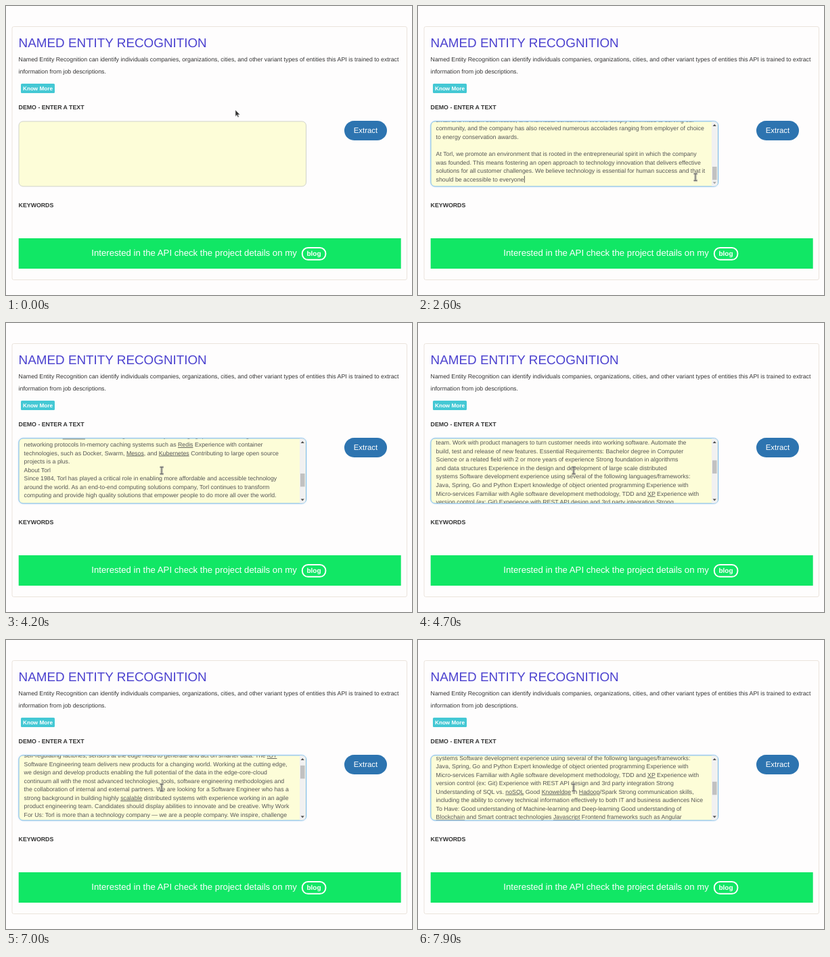
An HTML page that plays this animation: 600 by 428 pixels, repeating every 8 s.

```html
<!DOCTYPE html>
<html lang="en">
<head>
<meta charset="utf-8">
<title>Named Entity Recognition</title>
<style>
html, body { margin: 0; width: 100%; height: 100%; overflow: hidden; background: #fefdfd; }
svg { display: block; }
text { font: 8.795px "Liberation Sans", Arial, sans-serif; fill: #333; white-space: pre; text-rendering: geometricPrecision; }
.bold { font-weight: bold; }
.white { fill: #fff; }
#lines text { fill: #555; }
.typo { text-decoration: underline; text-decoration-color: #9a8580; text-decoration-thickness: .7px; }
#box.focus { stroke: #66afe9; filter: drop-shadow(0 0 1px rgba(102,175,233,.5)); }
</style>
</head>
<body>
<svg width="600" height="428" viewBox="0 0 600 428">
  <clipPath id="inside"><rect x="19.3" y="171.2" width="423.9" height="95.6" rx="5.5"/></clipPath>
  <rect x="9" y="30.5" width="583.5" height="375" rx="2.5" fill="#fefdfd" stroke="#ebe4dc"/>
  <text x="18.6" y="60.5" style="font-size:18.85px;fill:#4b41cf">NAMED ENTITY RECOGNITION</text>
  <text x="18.6" y="82.2">Named Entity Recognition can identify individuals companies, organizations, cities, and other variant types of entities this API is trained to extract</text>
  <text x="18.6" y="100">information from job descriptions.</text>
  <rect x="22" y="115" width="50" height="14" rx="1.5" fill="#44c8d4"/>
  <text class="bold white" x="47" y="124.9" text-anchor="middle" style="font-size:8.165px">Know More</text>
  <text class="bold" x="18.6" y="153">DEMO - ENTER A TEXT</text>
  <text class="bold" x="18.6" y="297.5">KEYWORDS</text>

  <rect id="box" x="19" y="170.9" width="424.5" height="96.2" rx="6" fill="#fdfdd8" stroke="#c4c8c0" stroke-width=".8"/>
  <g clip-path="url(#inside)">
    <g id="lines"></g>
    <rect id="caret" width=".8" height="10" fill="#333"/>
    <g id="bar">
      <rect x="434" y="171" width="8.6" height="96" fill="#f1f1f1"/>
      <rect id="thumb" x="435" width="6.6" height="19.5" fill="#c1c1c1"/>
      <path id="up" d="M435.6 178L438.2 175L440.8 178Z"/>
      <path id="down" d="M435.6 260.5L438.2 263.5L440.8 260.5Z"/>
    </g>
  </g>

  <rect x="500" y="170" width="63" height="29" rx="14.5" fill="#2d74b0"/>
  <text class="white" x="531.5" y="188.3" text-anchor="middle" style="font-size:11.4px">Extract</text>
  <rect x="18.7" y="344" width="565" height="45" fill="#11e765"/>
  <text class="white" x="126.3" y="370.3" style="font-size:13.2px">Interested in the API check the project details on my</text>
  <rect x="437.8" y="358" width="34.6" height="17.8" rx="8.5" fill="none" stroke="#fff" stroke-width="1.9"/>
  <text class="bold white" x="455" y="370.4" text-anchor="middle" style="font-size:10px">blog</text>

  <g id="mouse">
    <path id="arrow" d="M0 0V9.4L2.2 7.4L3.7 10.8L5.2 10.1L3.7 6.9H6.7Z" fill="#333" stroke="#ddd" stroke-width=".6"/>
    <g id="beam" fill="none">
      <path d="M-2.5-5H3M-2.5 5H3M0-5V5" stroke="#c4c4b4" stroke-width="3.4"/>
      <path d="M-2.5-5H2.5M-2.5 5H2.5M0-5V5" stroke="#666"/>
    </g>
  </g>
</svg>
<script>
const essay = `IOT Software Engineer 2 Harnessing the full potential of IoT requires adding intelligence to every
stage. Smarter data gathering at the edge, smarter compute at the core and deeper learning at the
cloud computing stage driving up the IQ of IoT. From self-driving cars to self-monitoring jet engines to
self-regulating factories, sensors at the edge need to generate and act on smarter data. The IOT
Software Engineering team delivers new products for a changing world. Working at the cutting edge,
we design and develop products enabling the full potential of the data in the edge-core-cloud
continuum all with the most advanced technologies, tools, software engineering methodologies and
the collaboration of internal and external partners. We are looking for a Software Engineer who has a
strong background in building highly scalable distributed systems with experience working in an agile
product engineering team. Candidates should display abilities to innovate and be creative. Why Work
For Us: Torl is more than a technology company — we are a people company. We inspire, challenge
and respect every one of our employees. We also provide them with unparalleled growth and
development opportunities. We can't wait for you to discover this for yourself as a Software
Engineer 2 on our team. Key Responsibilities: Design and build scalable services for edge devices
and gateways. Write clean and well tested code and review the work of other engineers on the
team. Work with product managers to turn customer needs into working software. Automate the
build, test and release of new features. Essential Requirements: Bachelor degree in Computer
Science or a related field with 2 or more years of experience Strong foundation in algorithms
and data structures Experience in the design and development of large scale distributed
systems Software development experience using several of the following languages/frameworks:
Java, Spring, Go and Python Expert knowledge of object oriented programming Experience with
Micro-services Familiar with Agile software development methodology, TDD and XP Experience with
version control (ex: Git) Experience with REST API design and 3rd party integration Strong
Understanding of SQL vs. noSQL Good Knoweldge in Hadoop/Spark Strong communication skills,
including the ability to convey technical information effectively to both IT and business audiences Nice
To Have: Good understanding of Machine-learning and Deep-learning Good understanding of
Blockchain and Smart contract technologies Javascript Frontend frameworks such as Angular
or similar, and ReactJS Understanding of web security, messaging queues and strong
networking protocols In-memory caching systems such as Redis Experience with container
technologies, such as Docker, Swarm, Mesos, and Kubernetes Contributing to large open source
projects is a plus.
About Torl
Since 1984, Torl has played a critical role in enabling more affordable and accessible technology
around the world. As an end-to-end computing solutions company, Torl continues to transform
computing and provide high quality solutions that empower people to do more all over the world.

Torl serves a wide range of customers, from large global enterprises and public agencies to
small and medium businesses, and individual consumers. We are deeply committed to serving our
community, and the company has also received numerous accolades ranging from employer of choice
to energy conservation awards.

At Torl, we promote an environment that is rooted in the entrepreneurial spirit in which the company
was founded. This means fostering an open approach to technology innovation that delivers effective
solutions for all customer challenges. We believe technology is essential for human success and that it
should be accessible to everyone`.split("\n");

const typos = /\b(IOT|IoT|scalable|XP|noSQL|Knoweldge|Hadoop|Blockchain|Javascript|ReactJS|Redis|Mesos|Kubernetes)\b/g;
const LINE = 12.55, LEFT = 26.6, BASE = 184.4, MAX = 477;
const LOOP = 8000, FOCUS = 1400, PASTE = 1900;

// Each key: time, then values
const mousePath = [[100, 339, 154], [700, 317, 196.5], [1500, 317, 196.5], [2600, 410, 253.5], [2800, 410, 253.5], [3600, 230, 218.5]];
const scrollPath = [[3600, MAX], [4200, 352.8], [5300, 0], [6200, 0], [7000, 48], [7900, 245.3]];

const $ = id => document.getElementById(id);
const show = (id, on) => $(id).setAttribute("visibility", on ? "visible" : "hidden");

$("lines").innerHTML = essay.map((line, i) =>
  `<text x="${LEFT}" y="${BASE + i * LINE}">${line.replace(typos, '<tspan class="typo">$1</tspan>')}</text>`).join("");
const endX = LEFT + $("lines").lastChild.getComputedTextLength() + .4;

function along(keys, t) {
  const i = keys.findIndex(k => k[0] > t);
  if (i === 0) return keys[0].slice(1);
  if (i < 0) return keys[keys.length - 1].slice(1);
  const a = keys[i - 1], b = keys[i], p = (t - a[0]) / (b[0] - a[0]);
  return a.slice(1).map((v, j) => v + (b[j + 1] - v) * p);
}

function draw(now) {
  const t = Math.floor(now % LOOP / 100) * 100;
  const [x, y] = along(mousePath, t);
  const [scroll] = along(scrollPath, t);
  const pasted = t >= PASTE, overBox = y > 171;

  $("mouse").setAttribute("transform", `translate(${x} ${y})`);
  show("arrow", !overBox);
  show("beam", overBox);

  $("box").classList.toggle("focus", t >= FOCUS);
  show("lines", pasted);
  show("bar", pasted);
  $("lines").setAttribute("transform", `translate(0 ${-scroll})`);
  $("thumb").setAttribute("y", 180 + 58 * scroll / MAX);
  $("up").setAttribute("fill", scroll > 0 ? "#505050" : "#a3a3a3");
  $("down").setAttribute("fill", scroll < MAX ? "#505050" : "#a3a3a3");

  show("caret", t >= FOCUS && t % 1000 >= 500);
  $("caret").setAttribute("x", pasted ? endX : LEFT);
  $("caret").setAttribute("y", BASE - 8 + (pasted ? (essay.length - 1) * LINE - scroll : 0));
}

const start = performance.now();
function tick() {
  draw(performance.now() - start);
  requestAnimationFrame(tick);
}
tick();
</script>
</body>
</html>
```
